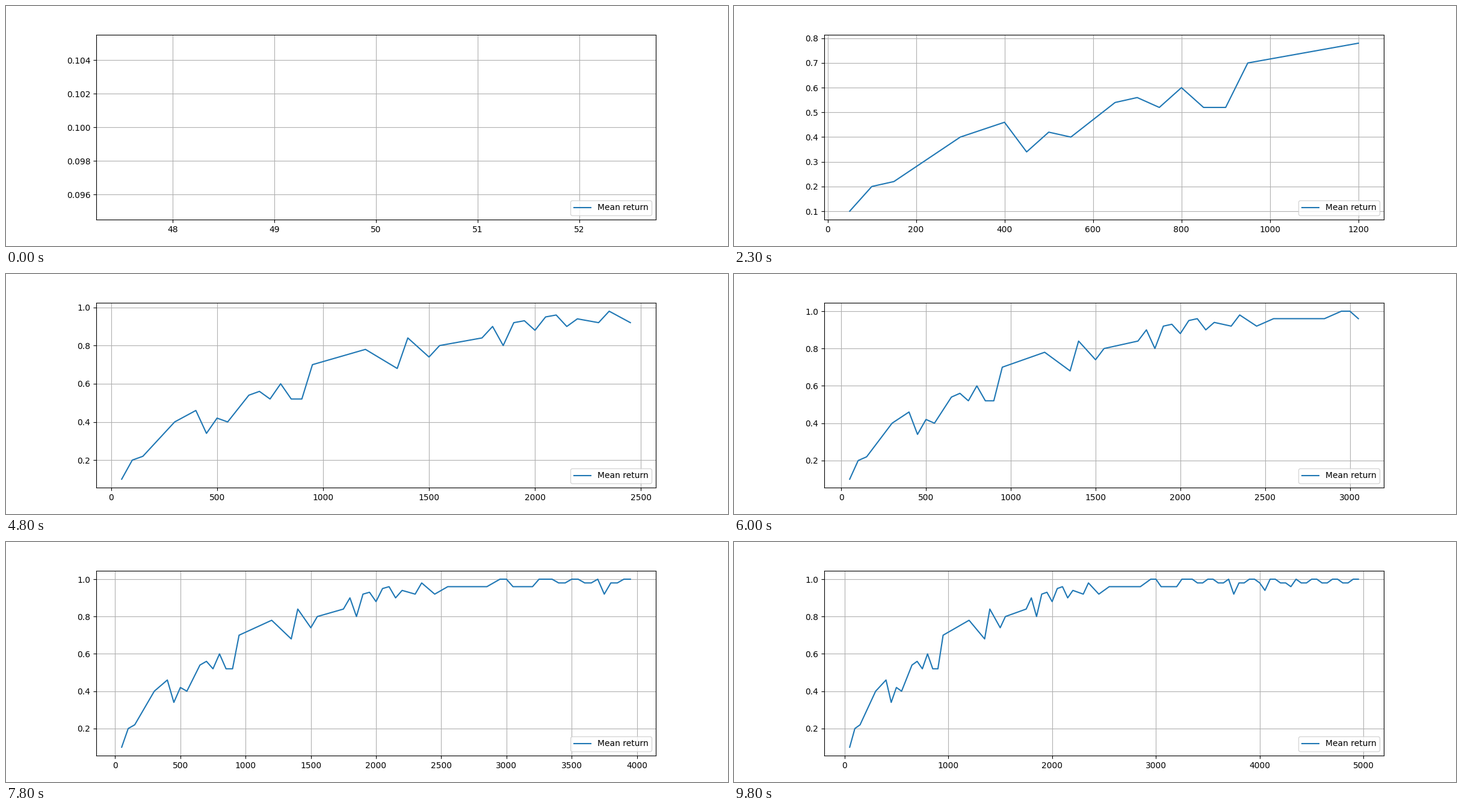
A matplotlib script for the animation above (9.9 s loop, 1200x400 px).

```python
import numpy as np
import matplotlib.pyplot as plt
from matplotlib.animation import FuncAnimation

COUNT = 99         # evaluations, one per frame
STEP = 50          # iterations between evaluations
INTERVAL = 100     # ms per evaluation

# Turning points of the learning curve: (evaluation, percent)
TURNS = [
    (1, 10), (2, 20), (3, 22), (6, 40), (8, 46), (11, 40), (13, 54),
    (16, 60), (18, 52), (19, 70), (24, 78), (27, 68), (28, 84), (30, 74),
    (31, 80), (35, 84), (36, 90), (38, 92), (42, 96), (46, 92), (47, 98),
    (49, 92), (51, 96), (57, 96), (59, 100), (60, 100), (61, 96), (64, 96),
    (65, 100),
]
# Single setbacks below the trend, in percent
DIPS = {9: 10, 15: 6, 17: 4, 37: 11, 40: 6, 43: 5, 75: 8, 81: 4, 86: 4}
CONVERGED = 65     # from here on only a small wobble remains


def learning_curve(k):
    percent = np.interp(k, *zip(*TURNS))
    percent -= [DIPS.get(n, 0) for n in k]
    percent[(k > CONVERGED) & (k % 4 < 2)] -= 2
    percent[-2:] = 100
    return percent / 100


evals = np.arange(1, COUNT + 1)
steps = STEP * evals
returns = learning_curve(evals)

fig, ax = plt.subplots(figsize=(12, 4), dpi=100)
line, = ax.plot([], [], label="Mean return")
ax.grid(True)
ax.legend(loc="lower right")


def update(i):
    line.set_data(steps[:i + 1], returns[:i + 1])
    ax.relim()
    ax.autoscale_view()
    return line,


def reset():
    return update(0)


anim = FuncAnimation(fig, update, frames=COUNT, init_func=reset,
                     interval=INTERVAL, repeat=True, repeat_delay=0, blit=False)
plt.show()
```
